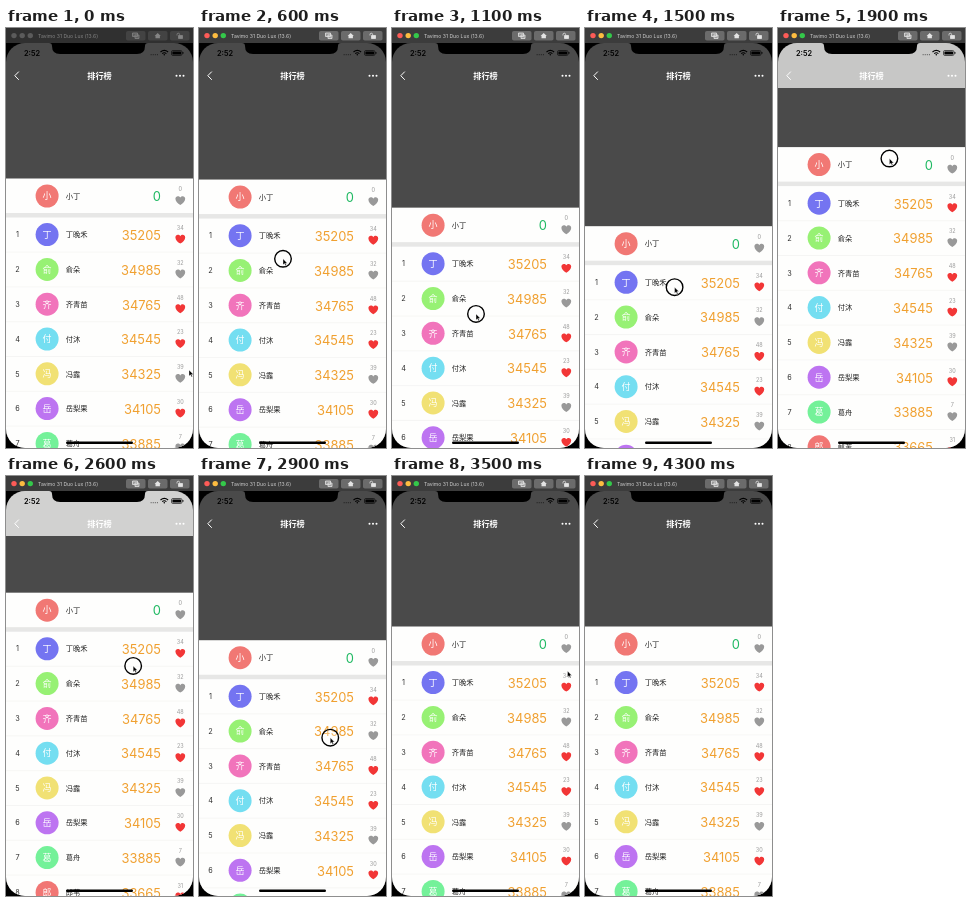
Recreate the animation shown at these times as an HTML page. Size 187 px wide and 420 px high, loop 4400 ms.

```html
<!DOCTYPE html>
<html lang="zh">
<head>
<meta charset="utf-8">
<style>
  html, body { margin: 0; width: 100%; height: 100%; overflow: hidden; background: #000; }
  svg { display: block; width: 187px; height: 420px; font-family: Inter, "Noto Sans CJK SC", "Noto Sans CJK", sans-serif; }
</style>
</head>
<body>
<svg viewBox="0 0 187 420">
  <defs>
    <clipPath id="screen"><rect y="15" width="187" height="405" rx="19"/></clipPath>
    <path id="heart" d="M0 4.6C-2.6 3-4.9 1-4.9-1.6C-4.9-4.7-1.2-5 0-2.8C1.2-5 4.9-4.7 4.9-1.6C4.9 1 2.6 3 0 4.6Z"/>
  </defs>
  <rect width="187" height="420"/>
  <g clip-path="url(#screen)">
    <rect y="15" width="187" height="405" fill="#4a4a4a"/>
    <g id="list"></g>
    <rect id="nav" y="15" width="187" height="45" fill="#fefefd"/>
    <g id="navItems">
      <path id="back" d="M12.8 43.6L8.8 47.7L12.8 51.8" fill="none"/>
      <text x="93.5" y="50.8" font-size="8.2" font-weight="700" text-anchor="middle">排行榜</text>
      <circle cx="170.5" cy="47.7" r="1"/><circle cx="174" cy="47.7" r="1"/><circle cx="177.5" cy="47.7" r="1"/>
    </g>
    <path d="M43 15Q46 15 46 18Q46 26 54 26H131Q139 26 139 18Q139 15 142 15Z"/>
    <text x="18" y="27.7" font-size="7.4" font-weight="600">2:52</text>
    <path d="M144.6 26.6h7.5" stroke="#000" stroke-width="1.1" stroke-dasharray="1.1 1" opacity=".45"/>
    <g fill="none" stroke="#000" stroke-width="1.1">
      <path d="M154.5 24Q158.3 20.8 162.1 24M156.2 25.6Q158.3 23.9 160.4 25.6"/>
      <rect x="165.5" y="22.5" width="10.5" height="5" rx="1.4" stroke-width=".6"/>
    </g>
    <circle cx="158.3" cy="26.8" r=".8"/>
    <rect x="166.4" y="23.4" width="8.7" height="3.2" rx=".7"/>
    <rect x="176.5" y="24" width=".9" height="2" rx=".4"/>
    <rect x="60" y="413.5" width="67" height="2.4" rx="1.2"/>
  </g>
  <rect id="bar" width="187" height="15"/>
  <g id="lights"><circle cx="8" cy="7.6" r="2.7"/><circle cx="16.2" cy="7.6" r="2.7"/><circle cx="24.3" cy="7.6" r="2.7"/></g>
  <text id="device" x="32" y="9.6" font-size="5.1">Tavimo 31 Duo Lux (13.6)</text>
  <g id="buttons"><rect x="120" y="3" width="19.5" height="9.5" rx="1.8"/><rect x="142" y="3" width="19.5" height="9.5" rx="1.8"/><rect x="164" y="3" width="19.5" height="9.5" rx="1.8"/></g>
  <g id="icons" stroke-width=".8">
    <path d="M126.5 5h5v3.5h-5zM129 7h4v3.5h-4z" fill-opacity=".4"/>
    <path d="M148.6 7.9L151.7 5l3.1 2.9h-.9v2.4h-4.4v-2.4z" stroke="none"/>
    <path d="M172.5 7.5h4v3h-4z"/><path d="M171 7.5v-1a1.3 1.3 0 0 1 2.6 0v1" fill="none"/>
  </g>
  <g id="cursor">
    <circle id="touch" r="8.3" fill="#fff" fill-opacity=".3" stroke="#000" stroke-width="1.4"/>
    <path d="M0 0V6.1L1.5 4.8L2.5 7.1L3.5 6.6L2.5 4.4H4.3Z" stroke="#fff" stroke-width=".4"/>
  </g>
</svg>
<script>
const $ = id => document.getElementById(id);
const LOOP = 4400, STEP = 100, PRESS = 500, RELEASE = 3000;
const ROW = 34.8, NAV_FADE = 45;

const names = '丁晚禾 俞朵 齐青苗 付沐 冯露 岳梨果 葛舟 郎苇 庞汐 汪芷'.split(' ');
const likes = [34, 32, 48, 23, 39, 30, 7, 31, 44, 1];

function entry({ y, rank = '', name, hue, score, scoreColor, likes, liked }) {
  return `<g transform="translate(0 ${y})">
    <text x="11.5" y="2.7" font-size="7.3" text-anchor="middle" fill="#333">${rank}</text>
    <circle cx="41.1" r="11.5" fill="hsl(${hue} 82% 70%)"/>
    <text x="41.1" y="3.3" font-size="9" text-anchor="middle" fill="#fff">${name[0]}</text>
    <text x="59.7" y="2.7" font-size="7.3" fill="#222">${name}</text>
    <text x="155" y="5.3" font-size="12.9" text-anchor="end" fill="${scoreColor}">${score}</text>
    <text x="174.3" y="-4.7" font-size="5.5" text-anchor="middle" fill="#999">${likes}</text>
    <use href="#heart" x="174.3" y="4.4" fill="${liked ? '#f23636' : '#999'}"/>
  </g>`;
}

function rankedEntry(name, i) {
  return entry({
    y: 206.6 + i * ROW, rank: i + 1, name,
    hue: 240 - 137 * i, // near golden angle, keeps neighbours distinct
    score: 35205 - 220 * i, scoreColor: '#f0a030',
    likes: likes[i], liked: i * i % 5 !== 1
  }) + `<path d="M0 ${224.1 + i * ROW}H187" stroke="#f0f0ee" stroke-width=".6"/>`;
}

$('list').innerHTML =
  '<rect y="150.5" width="187" height="600" fill="#fefefd"/><rect y="185" width="187" height="4.5" fill="#e7e7e6"/>' +
  entry({ y: 168, name: '小丁', hue: 2, score: 0, scoreColor: '#1fb962', likes: 0 }) +
  names.map(rankedEntry).join('');

// Turning points of each motion, eased in between
const scrollPath = [
  { t: PRESS, y: 0 }, { t: 1555, y: 48 }, { t: 2240, y: -109 }, { t: 2870, y: 14 }, { t: 3200, y: 0 }
];
const cursorPath = [
  { t: 0, x: 183, y: 342 }, { t: PRESS, x: 84, y: 228 }, { t: 1250, x: 84, y: 292 }, { t: 2235, x: 121, y: 74 },
  { t: 2870, x: 131, y: 262 }, { t: 3500, x: 175.5, y: 195 }, { t: 3700, x: 200, y: 192 }
];

const ease = p => (1 - Math.cos(Math.PI * p)) / 2;

function follow(path, t) {
  const next = path.findIndex(k => k.t > t);
  if (next === 0) return path[0];
  if (next < 0) return path[path.length - 1];
  const a = path[next - 1], b = path[next], p = ease((t - a.t) / (b.t - a.t));
  return { x: a.x + (b.x - a.x) * p, y: a.y + (b.y - a.y) * p };
}

function render(t) {
  const scroll = follow(scrollPath, t).y;
  const { x, y } = follow(cursorPath, t);
  const fade = Math.min(1, Math.max(0, -scroll / NAV_FADE));
  const ink = fade === 1 ? '#000' : '#fff';
  const active = t >= PRESS;

  $('list').setAttribute('transform', `translate(0 ${scroll})`);
  $('nav').setAttribute('opacity', fade);
  $('navItems').setAttribute('fill', ink);
  $('back').setAttribute('stroke', ink);
  $('cursor').setAttribute('transform', `translate(${x} ${y})`);
  $('touch').setAttribute('visibility', active && t < RELEASE ? 'visible' : 'hidden');

  const iconColor = active ? '#e4e4e4' : '#858585';
  $('bar').setAttribute('fill', active ? '#3c3c3c' : '#303030');
  $('device').setAttribute('fill', active ? '#d2d2d2' : '#858585');
  $('buttons').setAttribute('fill', active ? '#6b6b6b' : '#434343');
  $('icons').setAttribute('stroke', iconColor);
  $('icons').setAttribute('fill', iconColor);
  [...$('lights').children].forEach((light, i) =>
    light.setAttribute('fill', active ? ['#fc5b57', '#fdbc40', '#34c84a'][i] : '#5b5b5b'));
}

const start = performance.now();
function tick() {
  const t = (performance.now() - start) % LOOP;
  render(Math.floor(t / STEP) * STEP);
  requestAnimationFrame(tick);
}
tick();
</script>
</body>
</html>
```
